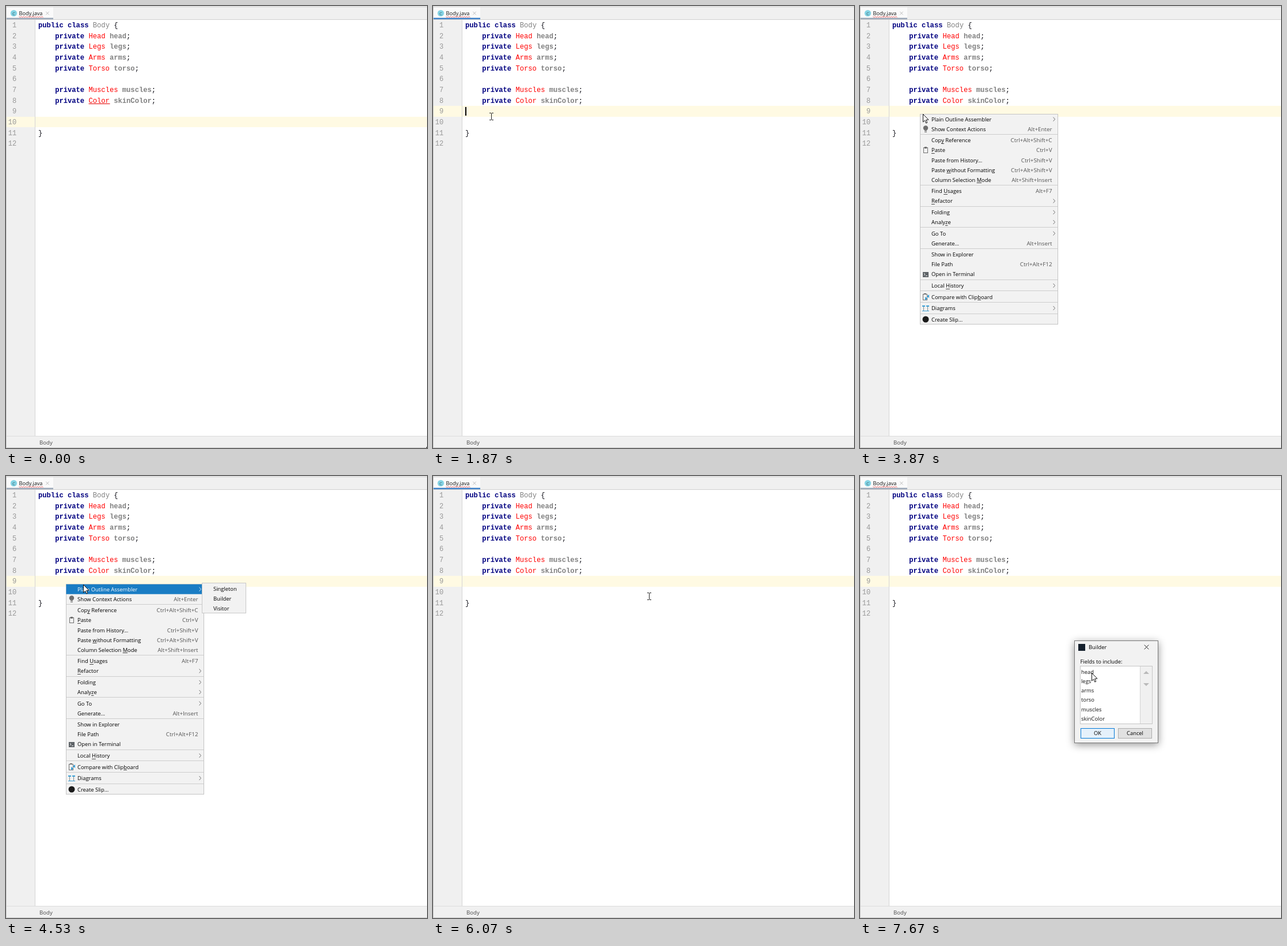
Recreate the animation shown at these times as an HTML page with a canvas. Size 731 px wide and 766 px high, loop 8 s.

```html
<!DOCTYPE html>
<html lang="en">
<head>
<meta charset="utf-8">
<title>Editor menu</title>
<style>
  html, body { margin: 0; width: 100%; height: 100%; overflow: hidden; background: #fff; }
  canvas { display: block; }
</style>
</head>
<body>
<canvas id="stage" width="731" height="766"></canvas>
<script>
const ctx = document.getElementById('stage').getContext('2d');
const LOOP = 8000, STEPS_PER_MS = 0.015;
const UI = '"Open Sans", sans-serif';
const MONO = '12.15px "Liberation Mono", monospace';
const COL = 7.29, ROW = 18.65;

const code = [
  'public class Body {',
  '    private Head head;',
  '    private Legs legs;',
  '    private Arms arms;',
  '    private Torso torso;',
  '',
  '    private Muscles muscles;',
  '    private Color skinColor;',
  '', '', '}', ''
];

// Groups of [label, shortcut or ">", icon]; "&" marks the mnemonic letter.
const menu = [
  [['Plain Outline Assembler', '>'], ['Show Context Actions', 'Alt+Enter', bulbIcon]],
  [['Cop&y Reference', 'Ctrl+Alt+Shift+C'], ['&Paste', 'Ctrl+V', pasteIcon],
   ['Paste from History...', 'Ctrl+Shift+V'], ['Paste &without Formatting', 'Ctrl+Alt+Shift+V'],
   ['Column Selection &Mode', 'Alt+Shift+Insert']],
  [['Find &Usages', 'Alt+F7'], ['&Refactor', '>']],
  [['Folding', '>'], ['Analy&ze', '>']],
  [['Go To', '>'], ['Generate...', 'Alt+Insert']],
  [['Show in Explorer'], ['File Path', 'Ctrl+Alt+F12'], ['Open in Terminal', '', terminalIcon]],
  [['Local &History', '>']],
  [['Compare with Clip&board', '', compareIcon]],
  [['Diagrams', '>', diagramIcon]],
  [['Create Slip...', '', dotIcon]]
];

// Pointer track: step, x, y
const track = [
  [7, 730, 764], [20, 157, 230], [26, 90, 181], [27, 90, 181], [28, 101, 191],
  [33, 104, 187], [57, 104, 187], [58, 109, 187], [62, 118, 188], [66, 118, 188],
  [77, 345.5, 190], [79, 372, 187], [80, 373, 187], [82, 373, 187], [86, 375, 208],
  [100, 374, 208], [108, 416, 298], [113, 398, 338], [115, 401.5, 341]
];

function slope(i, axis) {
  const rate = k => track[k] && track[k + 1]
    ? (track[k + 1][axis] - track[k][axis]) / (track[k + 1][0] - track[k][0]) : 0;
  const a = rate(i - 1), b = rate(i);
  return a * b <= 0 ? 0 : Math.abs(a) < Math.abs(b) ? a : b;
}

function pointerAt(n) {
  const last = track.length - 1;
  if (n <= track[0][0]) return track[0].slice(1);
  if (n >= track[last][0]) return track[last].slice(1);
  const i = track.findIndex(k => k[0] > n) - 1;
  const span = track[i + 1][0] - track[i][0], u = (n - track[i][0]) / span;
  return [1, 2].map(axis => {
    const a = track[i][axis], b = track[i + 1][axis], s = u * u * (3 - 2 * u);
    return a + (b - a) * s + span * u * (1 - u) *
      ((1 - u) * slope(i, axis) - u * slope(i + 1, axis));
  });
}

function rect(x, y, w, h, color) {
  ctx.fillStyle = color;
  ctx.fillRect(x, y, w, h);
}

function box(x, y, w, h, fill, border) {
  rect(x, y, w, h, border);
  rect(x + 1, y + 1, w - 2, h - 2, fill);
}

function text(str, x, y, color, font = '9.4px ' + UI, align = 'left') {
  ctx.font = font;
  ctx.textAlign = align;
  ctx.fillStyle = color;
  ctx.fillText(str, x, y);
}

function path(points, color, width = 1) {
  ctx.beginPath();
  points.forEach(([x, y]) => ctx.lineTo(x, y));
  ctx.strokeStyle = color;
  ctx.lineWidth = width;
  ctx.stroke();
}

function polygon(points, fill) {
  ctx.beginPath();
  points.forEach(([x, y]) => ctx.lineTo(x, y));
  ctx.closePath();
  ctx.fillStyle = fill;
  ctx.fill();
}

function disc(x, y, r, color) {
  ctx.beginPath();
  ctx.arc(x, y, r, 0, Math.PI * 2);
  ctx.fillStyle = color;
  ctx.fill();
}

function cross(x, y, r, color) {
  path([[x - r, y - r], [x + r, y + r]], color);
  path([[x - r, y + r], [x + r, y - r]], color);
}

function bulbIcon(x, y) {
  disc(x, y - 1.5, 4.2, '#6e6e6e');
  rect(x - 2, y + 3, 4, 1, '#6e6e6e');
  rect(x - 2, y + 5, 4, 1, '#6e6e6e');
}
function pasteIcon(x, y) {
  box(x - 4, y - 5, 8, 10, '#f2f2f2', '#6e6e6e');
  rect(x - 2, y - 6, 4, 3, '#6e6e6e');
}
function terminalIcon(x, y) {
  rect(x - 5, y - 4, 10, 9, '#5f6468');
  path([[x - 3, y - 2], [x - 1, y], [x - 3, y + 2]], '#f2f2f2');
  rect(x, y + 2, 3, 1, '#f2f2f2');
}
function compareIcon(x, y) {
  box(x - 5, y - 5, 8, 11, '#f2f2f2', '#6e6e6e');
  rect(x - 3, y - 6, 4, 2, '#6e6e6e');
  polygon([[x + 6, y - 4], [x + 2, y - 1], [x + 6, y + 2]], '#389fd6');
  polygon([[x - 1, y], [x + 3, y + 3], [x - 1, y + 6]], '#389fd6');
}
function diagramIcon(x, y) {
  rect(x - 6, y - 5, 5, 2, '#389fd6');
  rect(x + 1, y - 5, 5, 2, '#389fd6');
  rect(x - 4, y - 3, 1, 7, '#7f8b91');
  rect(x + 3, y - 3, 1, 7, '#7f8b91');
  rect(x - 6, y + 4, 12, 1, '#389fd6');
}
function dotIcon(x, y) { disc(x, y, 5.5, '#1b1b1b'); }

function drawCode(str, y) {
  for (const { 0: word, index } of str.matchAll(/\w+|[{};]/g)) {
    const keyword = /^(public|class|private)$/.test(word);
    const bold = keyword || /^[a-z]/.test(word);
    const color = keyword ? '#000080' : word === 'Body' || bold ? '#808080'
      : /^[A-Z]/.test(word) ? '#ff0000' : '#101018';
    text(word, 56 + index * COL, y, color, (bold ? 'bold ' : '') + MONO);
  }
}

function drawEditor(clicked, focused, caret) {
  rect(0, 0, 731, 766, '#fff');
  rect(0, 0, 731, 23, '#f0f0f0');
  rect(1, 2, 81, 19, '#fafafa');
  rect(0, 1, 731, 1, '#cfcfcf');
  rect(0, 23, 731, 1, '#d0d0d0');
  rect(1, 20.5, 81, 2.5, focused ? '#4083c9' : '#9ca9b9');
  disc(13.5, 12.5, 5.6, '#84d3e4');
  text('C', 13.5, 15.5, '#35616c', '8px ' + UI, 'center');
  text('Body.java', 22.5, 16, '#111', '9.2px ' + UI);
  const wave = Array.from({ length: 22 }, (_, i) => [22.5 + i * 2, 18.2 + i % 2 * 1.5]);
  path(wave, '#ff3b3b', 0.8);
  cross(72, 12.5, 2.7, '#bcbcbc');

  rect(1, 24, 49, 721, '#f0f0f0');
  rect(1, clicked ? 173 : 192, 730, clicked ? 19 : 18, '#fffae3');
  rect(50, 24, 1, 721, '#d4d4d4');
  code.forEach((str, i) => {
    const y = 37 + i * ROW;
    text(i + 1, 18.4, y, '#999', MONO, 'right');
    drawCode(str, y);
  });
  if (!clicked) rect(143.5, 169, 37, 1, '#e00000');
  if (caret) rect(56, 175, 2, 15, '#000');

  rect(0, 745, 731, 21, '#f0f0f0');
  rect(0, 745, 731, 1, '#dcdcdc');
  text('Body', 58, 759.6, '#4a4a4a', '9.6px ' + UI);
  rect(0, 765, 731, 1, '#c8c8c8');
  rect(0, 0, 1, 766, '#c8c8c8');
}

function drawMenu(selected) {
  box(104, 187, 240, 365, '#f2f2f2', '#c4c4c4');
  let y = 196.2;
  menu.forEach((group, g) => {
    if (g) {
      rect(105, Math.round(y - 8.2), 238, 1, '#cdcdcd');
      y += 2.45;
    }
    group.forEach(([label, extra, icon], i) => {
      const lit = selected && !g && !i;
      const ink = lit ? '#fff' : '#000';
      if (lit) rect(104.5, 187.7, 238.5, 17, '#1a7dc4');
      const [before, rest] = label.split('&');
      text(label.replace('&', ''), 124, y + 3.5, ink);
      if (rest) {
        const left = 124 + ctx.measureText(before).width;
        rect(left, Math.round(y + 5), ctx.measureText(rest[0]).width, 1, '#444');
      }
      if (extra === '>') {
        path([[335.5, y - 3.5], [338.5, y], [335.5, y + 3.5]], lit ? '#cfe4f4' : '#6e6e6e');
      } else if (extra) {
        text(extra, 333.5, y + 3.5, '#555', '9.8px ' + UI, 'right');
      }
      if (icon) icon(114, Math.round(y));
      y += 17.1;
    });
  });
}

function drawSubmenu(selected) {
  box(340, 185, 77, 53, '#f2f2f2', '#c8c8c8');
  ['Singleton', 'Builder', 'Visitor'].forEach((label, i) => {
    const lit = i === selected;
    if (lit) rect(341, 186 + i * 17, 75, 17, '#1a7dc4');
    text(label, 360, 198.5 + i * 17, lit ? '#fff' : '#000');
  });
}

function button(x, label, fill, border) {
  box(x, 437, 59, 18, fill, border);
  text(label, x + 29.5, 449.3, '#000', undefined, 'center');
}

function drawDialog(progress) {
  const scale = 0.9 + 0.1 * progress;
  ctx.save();
  ctx.globalAlpha = progress;
  ctx.translate(445, 374);
  ctx.scale(scale, scale);
  ctx.translate(-445, -374);
  ctx.save();
  ctx.shadowColor = 'rgba(0,0,0,0.42)';
  ctx.shadowBlur = 13;
  ctx.shadowOffsetY = 3;
  rect(372, 285, 146, 178, '#777');
  ctx.restore();
  rect(373, 286, 144, 176, '#f2f2f2');
  rect(379, 291, 12, 12, '#15202d');
  text('Builder', 397, 300.4, '#000');
  cross(497.5, 296.5, 3.8, '#222');
  text('Fields to include:', 382.5, 325, '#000');
  box(382, 329, 126, 101, '#fff', '#c6c6c6');
  rect(487, 330, 20, 99, '#f0f0f0');
  rect(486, 330, 1, 99, '#d4d4d4');
  polygon([[492, 343], [497, 338], [502, 343]], '#b9b9b9');
  polygon([[492, 359], [497, 364], [502, 359]], '#b9b9b9');
  ['head', 'legs', 'arms', 'torso', 'muscles', 'skinColor'].forEach((field, i) =>
    text(field, 384, 342.6 + i * 16.25, '#111'));
  button(383, 'OK', '#e5f1fb', '#0078d7');
  button(448, 'Cancel', '#e1e1e1', '#adadad');
  ctx.restore();
}

function drawArrow(x, y) {
  const shape = [[0, 0], [0, 13.5], [3.1, 10.7], [5.2, 15.5], [7.3, 14.6], [5.2, 9.9], [9.5, 9.6]]
    .map(([dx, dy]) => [x + dx + 0.5, y + dy + 0.5]);
  polygon(shape, '#fff');
  path([...shape, shape[0], shape[1]], '#111');
}

function drawBeam(x, y) {
  rect(x, y - 5, 1, 11, '#222');
  for (const edge of [-6, 6]) {
    rect(x - 3, y + edge, 3, 1, '#222');
    rect(x + 1, y + edge, 3, 1, '#222');
  }
}

function draw(t) {
  const n = Math.floor((t + 4) * STEPS_PER_MS);
  const [x, y] = pointerAt(n).map(Math.round);
  const clicked = n >= 28;
  const menuOpen = n >= 37 && n < 91;
  const dialogOpen = n >= 93;
  drawEditor(clicked, clicked && !menuOpen && n < 92, clicked && n < 36);
  if (menuOpen) {
    drawMenu(n >= 59);
    if (n >= 62) drawSubmenu(n < 78 ? -1 : y < 203 ? 0 : 1);
  }
  if (dialogOpen) drawDialog([0.35, 0.8, 0.985][n - 93] || 1);
  const beam = n >= 8 && !menuOpen && !dialogOpen;
  (beam ? drawBeam : drawArrow)(x, y);
}

function tick(now) {
  draw(now % LOOP);
  requestAnimationFrame(tick);
}
draw(0);
requestAnimationFrame(tick);
</script>
</body>
</html>
```
